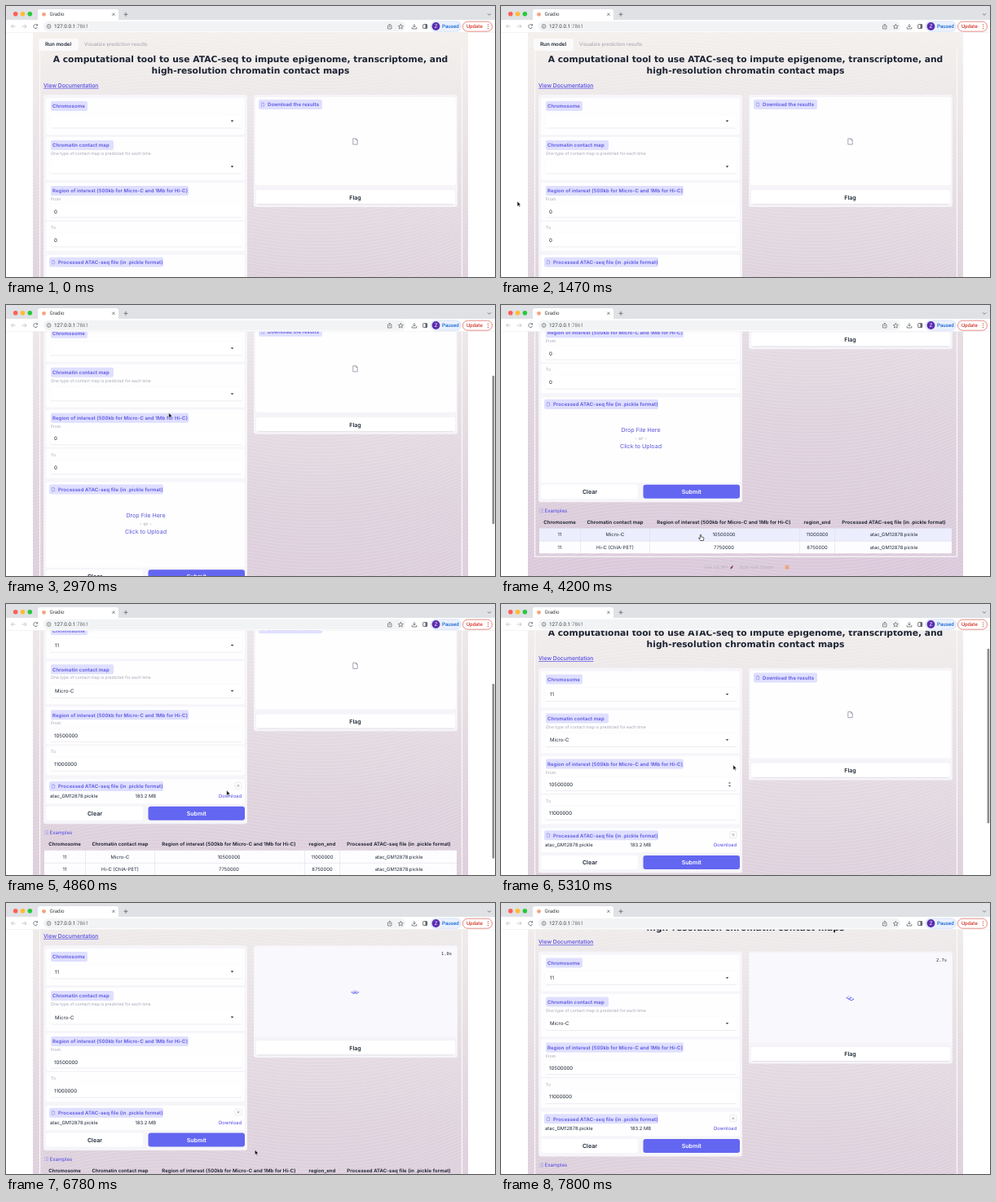
An HTML page for the animation above (7830 ms loop, 600 by 333 pixels).

```html
<!DOCTYPE html>
<html lang="en">
<head>
<meta charset="utf-8">
<title>Gradio</title>
<style>
  html, body { margin: 0; width: 100%; height: 100%; overflow: hidden; background: #fff; }
  svg { display: block; width: 600px; height: 333px; }
  text { font: 400 6.1px Inter, "Open Sans", sans-serif; fill: #1f2937; text-rendering: geometricPrecision; }
  .label { font-size: 6px; font-weight: 600; letter-spacing: .015em; fill: #5a55e0; }
  .hint { font-size: 5.1px; fill: #a3a7b3; }
  .title { font: bold 10.72px "DejaVu Sans", sans-serif; fill: #1c2333; }
  .tab { font-size: 6.3px; font-weight: 600; }
  .muted { fill: #a0a1a9; }
  .link { fill: #4f46e5; }
  .doc { font-size: 6.8px; font-weight: 500; text-decoration: underline; }
  .drop { font-size: 7.1px; fill: #5a55d6; }
  .button { font-size: 7.1px; font-weight: 600; }
  .head { font-size: 6px; font-weight: 600; fill: #111827; letter-spacing: .01em; }
  .cell { font-size: 5.9px; }
  .foot { font-size: 5.4px; fill: #bbb0bb; }
  .mid { text-anchor: middle; }
  .end { text-anchor: end; }
  .mono { font: 5.4px "DejaVu Sans Mono", monospace; }
  .chrome { font: 6.2px Roboto, sans-serif; fill: #3c4043; }
  .icon { fill: none; stroke: #5f6368; stroke-width: .8; }
  .faint { stroke: #b9bbc0; }
</style>
</head>
<body>
<svg id="stage" viewBox="0 0 600 333"></svg>
<script>
const LOOP = 7830, FILL_AT = 4410, SUBMIT_AT = 6110;
const VIEW_TOP = 33, VIEW_HEIGHT = 300, COLLAPSE = 74, FRAME_BOTTOM = 502;

// Builders: all page coordinates are for an unscrolled page.
const text = (x, y, s, cls = '', attrs = '') => `<text x="${x}" y="${y}" class="${cls}" ${attrs}>${s}</text>`;
const rect = (x, y, w, h, fill, r = 0, attrs = '') =>
  `<rect x="${x}" y="${y}" width="${w}" height="${h}" rx="${r}" fill="${fill}" ${attrs}/>`;
const path = (d, attrs = 'class="icon"') => `<path d="${d}" ${attrs}/>`;
const circle = (x, y, r, fill) => `<circle cx="${x}" cy="${y}" r="${r}" fill="${fill}"/>`;
const group = (id, ...parts) => `<g id="${id}">${parts.join('')}</g>`;
const block = (x, y, w, h) => rect(x, y, w, h, '#fefeff', 2.5);
const pill = (x, y, w, s, pad = 2) => rect(x, y, w, 12, '#dfdfff', 2) + text(x + pad, y + 8.3, s, 'label');
const fileIcon = (x, y, k, color) =>
  path('M-3-4H1L3-2V4H-3ZM1-4V-2H3', `transform="translate(${x} ${y}) scale(${k})" fill="none" stroke="${color}" stroke-width=".9"`);
const field = y => rect(54, y, 236, 17, '#fff', 2, 'stroke="#f9f9fb" stroke-width=".6"') +
  path(`M55 ${y + 17}H289`, 'stroke="#e9e9ee" stroke-width=".7"');
const arrow = y => path(`M275.7 ${y}h3.6l-1.8 1.9z`, 'fill="#1f2937"');

function background() {
  let waves = '';
  for (let y = 40; y < 620; y += 4) waves += `M33 ${y}q130-46 267-20t267-34`;
  return `<defs><linearGradient id="sky" x1="0" y1="0" x2="0" y2="1">
    <stop offset="0" stop-color="#f3f0ed"/><stop offset=".3" stop-color="#e8e1e5"/>
    <stop offset=".6" stop-color="#dfd3dd"/><stop offset="1" stop-color="#dac9db"/></linearGradient>
    <clipPath id="column"><rect x="33" y="32" width="534" height="494"/></clipPath></defs>` +
    rect(33, 32, 534, 494, 'url(#sky)') +
    path(waves, 'fill="none" stroke="#fff" opacity=".18" clip-path="url(#column)"');
}

function header() {
  return rect(40, 40, 49, 15, '#fbfafa', 2) +
    text(48, 48.9, 'Run model', 'tab') +
    text(96, 48.9, 'Visualize prediction results', 'muted') +
    text(300, 69.2, 'A computational tool to use ATAC-seq to impute epigenome, transcriptome, and', 'title mid') +
    text(300, 83.4, 'high-resolution chromatin contact maps', 'title mid') +
    text(46, 99.8, 'View Documentation', 'link doc');
}

function inputs() {
  return block(49, 113, 244, 45) + pill(55, 117, 45, 'Chromosome') + field(133) + arrow(140.6) +
    block(49, 161, 244, 53) + pill(55, 165, 77, 'Chromatin contact map') +
    text(55, 183.2, 'One type of contact map is predicted for each time', 'hint') + field(189) + arrow(196.6) +
    block(49, 217, 244, 46) + pill(55, 221, 169, 'Region of interest (500kb for Micro-C and 1Mb for Hi-C)') +
    text(55, 239, 'From', 'hint') + field(243) +
    block(49, 265, 244, 36) + text(55, 274.2, 'To', 'hint') + field(279);
}

function emptyForm() {
  return block(49, 306, 244, 105) + text(59, 254.5, '0') + text(59, 289.8, '0') +
    text(171.5, 349.2, 'Drop File Here', 'drop mid') +
    text(171.5, 359, '- or -', 'muted mid') +
    text(171.5, 369.2, 'Click to Upload', 'drop mid');
}

function filledForm() {
  return block(49, 306, 244, 30) + text(60, 143.6, '11') + text(60, 199.6, 'Micro-C') +
    text(59, 254.5, '10500000') + text(59, 289.8, '11000000') +
    text(54, 328.6, 'atac_GM12878.pickle', 'cell') + text(158.5, 328.6, '183.2 MB', 'cell') +
    text(289, 328.6, 'Download', 'cell link end') +
    rect(281, 310, 8, 8, '#fff', 1.5, 'stroke="#dcdce4" stroke-width=".6"') +
    path('M283.5 312.5l3 3m0-3l-3 3', 'stroke="#7c8090" stroke-width=".6"');
}

function lowerPart() {
  const centers = [72, 140, 273.5, 388, 482];
  const row = (y, cls, cells) => cells.map((s, i) => text(centers[i], y, s, cls + ' mid')).join('');
  return rect(49, 413.5, 119, 17, '#fff', 3) + text(109, 424.6, 'Clear', 'button mid') +
    rect(174.5, 413.5, 118.5, 17, '#6366f1', 3, 'id="submit"') +
    text(233.7, 424.6, 'Submit', 'button mid', 'style="fill:#fff"') +
    path('M47 443.5h1m1 0h3M47 445.5h1m1 0h3M47 447.5h1m1 0h3', 'stroke="#8a87e8" stroke-width=".6"') +
    text(53.5, 447.5, 'Examples', 'link', 'font-weight="500"') +
    rect(47, 467.5, 506, 30.5, '#fdfdff', 1) + rect(47, 467.5, 506, 15.5, '#eceefd', 0, 'id="rowHover"') +
    path('M47 467.5H553M47 483H553M97.5 467.5V498M182.5 467.5V498M366.5 467.5V498M409.5 467.5V498',
      'stroke="#dfdfe8" stroke-width=".6"') +
    row(462.2, 'head', ['Chromosome', 'Chromatin contact map', 'Region of interest (500kb for Micro-C and 1Mb for Hi-C)',
      'region_end', 'Processed ATAC-seq file (in .pickle format)']) +
    row(477.3, 'cell', ['11', 'Micro-C', '10500000', '11000000', 'atac_GM12878.pickle']) +
    row(493, 'cell', ['11', 'Hi-C (ChIA-PET)', '7750000', '8750000', 'atac_GM12878.pickle']) +
    text(249, 517, 'Use via API', 'foot') + path('M281 517.5l1-3 3-2-1 3.5z', 'fill="#8c4a5e"') +
    text(290, 517, '· Built with Gradio', 'foot') + rect(348.5, 512.5, 5, 5, '#eda883', 1);
}

function output() {
  const upper = 'M256 0L510 140V221L256 82L0 221V140Z';
  const lower = 'M0 140L255 280L510 140V221L255 361L0 221Z';
  const ring = id => group(id, path(upper, 'fill="#6366f1" opacity=".4"'), path(lower, 'fill="#6366f1"'));
  return rect(304, 109, 250, 138, '#f6f4f8', 3) + block(306, 112, 246, 108) +
    group('ready', pill(310, 115, 78, 'Download the results', 11), fileIcon(315, 121, .55, '#7c78e6'),
      fileIcon(428.5, 166.5, .9, '#8f93a0')) +
    group('loading', rect(305, 111, 248, 110, '#f9f9fd', 2),
      text(547, 121.3, '', 'mono end', 'id="timer"'),
      `<g transform="translate(428.3 166.5) scale(.0125)">${ring('ringA')}${ring('ringB')}</g>`) +
    rect(307, 226.3, 244, 17, '#fff', 2.5) + path('M309 243.8H549', 'stroke="#dddbe2" stroke-width=".8"') +
    text(428.5, 237.8, 'Flag', 'button mid');
}

function browser() {
  const lights = ['#ff5f57', '#febc2e', '#28c840'].map((c, i) => circle(11.7 + i * 8.8, 9.8, 2.8, c)).join('');
  const thin = 'class="icon" style="stroke-width:.7"';
  return rect(0, 0, 600, 18, '#dfe1e5') + lights + rect(39, 4, 99, 16, '#fff', 3) + rect(0, 17, 600, 15.6, '#fff') +
    circle(46.5, 10.3, 2.4, '#f3a27c') + text(53.5, 12.4, 'Gradio', 'chrome') +
    path('M130.3 8.7l3.2 3.2m0-3.2l-3.2 3.2M147 7.8v5m-2.5-2.5h5M591 9.3l2 2 2-2') +
    path('M11.5 25H6.5m2.3-2.3L6.5 25l2.3 2.3M19.5 25H25m-2.3-2.3L25 25l-2.3 2.3', 'class="icon faint"') +
    path('M38.4 23.7a2.5 2.5 0 1 0 .2 2.2M38.6 22.1v1.9h-1.9') +
    rect(46, 18.8, 444, 12.5, '#f1f3f4', 6.2) +
    path('M55 25a2.4 2.4 0 1 1-4.8 0a2.4 2.4 0 1 1 4.8 0M52.6 24.6v1.7M52.6 23.2v.6', thin) +
    text(59, 27.2, '127.0.0.1<tspan fill="#777b80">:7861</tspan>', 'chrome', 'style="font-size:6.35px"') +
    path('M469.5 24h-1v4h4.5v-4h-1M470.8 26.3V22m-1.3 1.3l1.3-1.3 1.3 1.3', thin) +
    path('M484.3 22.3l.9 2 2.1.2-1.6 1.4.5 2.1-1.9-1.1-1.9 1.1.5-2.1-1.6-1.4 2.1-.2z', thin) +
    path('M501 22v4m-1.8-1.7l1.8 1.8 1.8-1.8M498.2 26v2h5.6v-2') +
    rect(511.7, 22.6, 5, 5, 'none', .6, 'stroke="#5f6368" stroke-width=".9"') + rect(514.5, 22.6, 2.2, 5, '#5f6368') +
    rect(521, 18.9, 37.5, 12.4, '#eaf1fd', 6.2, 'stroke="#c5d6f5" stroke-width=".6"') +
    circle(527.5, 25, 4.9, '#5b2db0') + text(527.5, 27, 'Z', 'chrome mid', 'style="fill:#fff"') +
    text(535, 27.3, 'Paused', 'chrome', 'style="fill:#1a67d2;font-weight:500"') +
    rect(560.5, 19.2, 36, 12, '#fff', 6, 'stroke="#dd7068" stroke-width=".8"') +
    text(565, 27.3, 'Update', 'chrome', 'style="fill:#d33a2f;font-weight:500"') +
    path('M591.5 22.2v1m0 1.4v1m0 1.4v1', 'stroke="#d33a2f" stroke-width="1.1"') +
    path('M0 32.6H600', 'stroke="#e6e7ea" stroke-width=".5"');
}

const stage = document.getElementById('stage');
stage.innerHTML = group('page', background(),
    path('', 'fill="none" stroke="#fbf8f5" stroke-width="1.3" id="frame"'), header(),
    rect(46, 109, 250, 326, '#f6f5f9', 3, 'id="card"'), inputs(), group('empty', emptyForm()), group('filled', filledForm()),
    pill(53, 308.7, 140, 'Processed ATAC-seq file (in .pickle format)', 11), fileIcon(58, 314.7, .55, '#7c78e6'),
    path('M278.8 251l1.7-1.9 1.7 1.9zM278.8 253.2h3.4l-1.7 1.9z', 'id="spinner" fill="#60636b"'),
    group('lower', lowerPart()), output()) +
  rect(596.6, 33, 2.6, 180, '#8b8b8e', 1.3, 'id="thumb"') + browser() +
  group('cursor',
    path('M0 0V6.3L1.5 4.9 2.5 7.1 3.5 6.7 2.5 4.5H4.5Z', 'id="arrow" fill="#111" stroke="#fff" stroke-width=".5"'),
    path('M-1.2 1.5V-3q.7-1 1.4 0V-.6L2.8 0q.7.3.6 1.1L2.9 4H-.8L-3 1q0-1 1.2-.1z',
      'id="hand" fill="#fff" stroke="#222" stroke-width=".7"'));

const el = id => document.getElementById(id);
const show = (id, on) => el(id).setAttribute('display', on ? 'inline' : 'none');
const move = (id, x, y) => el(id).setAttribute('transform', `translate(${x} ${y})`);
const within = (t, from, to) => t >= from && t < to;
const linear = u => u;
const smooth = u => u * u * (3 - 2 * u);

// Each key is [time, ...values].
function track(keys, t, ease) {
  const i = keys.findIndex(k => k[0] > t);
  if (i < 0) return keys.at(-1).slice(1);
  if (i === 0) return keys[0].slice(1);
  const [a, b] = [keys[i - 1], keys[i]];
  const u = ease((t - a[0]) / (b[0] - a[0]));
  return a.slice(1).map((v, n) => v + (b[n + 1] - v) * u);
}

const scrollKeys = [[2370, 0], [2490, 16], [2700, 16], [2970, 88], [3180, 121], [3480, 121], [3900, 192.8], [4409, 192.8],
  [4410, 119], [4650, 119], [5310, 30.5], [5430, 27], [5580, 27], [5820, 53], [5910, 57], [6810, 57], [7200, 49.4]];
const cursorKeys = [[480, -12, 300], [690, 6, 260], [870, 6, 260], [990, 20, 240], [1620, 20, 240], [2250, 199.7, 132.5],
  [3480, 199.7, 132.5], [4080, 245.5, 285.5], [4420, 245.5, 285.5], [5160, 284.8, 197.7], [5400, 284.8, 197.7],
  [5880, 260, 288], [6500, 260, 288], [7300, 420, 342]];
const RING_PERIOD = 1440;
const ringKeys = [[0, 125, 140], [360, -125, 140], [720, -125, 0], [1080, 125, 0], [RING_PERIOD, 125, 140]];

function draw(t) {
  const filled = t >= FILL_AT, loading = t >= SUBMIT_AT;
  const [scroll] = track(scrollKeys, t, linear);
  const shift = filled ? COLLAPSE : 0;
  move('page', 0, -scroll);
  move('lower', 0, -shift);
  el('card').setAttribute('height', 326 - shift);
  el('frame').setAttribute('d', `M41.5 53V${FRAME_BOTTOM - shift}H559.5V53`);
  show('empty', !filled);
  show('filled', filled);
  show('ready', !loading);
  show('loading', loading);
  show('spinner', within(t, 5100, 5600));

  const ratio = VIEW_HEIGHT / (493 - shift);
  show('thumb', within(t, 2370, 4150) || within(t, 4600, 6250) || within(t, 6810, 7500));
  el('thumb').setAttribute('y', VIEW_TOP + scroll * ratio);
  el('thumb').setAttribute('height', VIEW_HEIGHT * ratio);

  const overRow = within(t, 4020, FILL_AT), overSubmit = within(t, 5800, 6650);
  show('rowHover', overRow);
  el('submit').setAttribute('fill', overSubmit ? '#8285f0' : '#6366f1');
  move('cursor', ...track(cursorKeys, t, smooth));
  show('hand', overRow || overSubmit);
  show('arrow', !(overRow || overSubmit));

  if (loading) {
    const elapsed = (t - SUBMIT_AT) * 1.6;
    el('timer').textContent = (Math.floor(elapsed / 100) / 10).toFixed(1) + 's';
    const [x, y] = track(ringKeys, elapsed % RING_PERIOD, smooth);
    move('ringA', x - 255, y - 180);
    move('ringB', -x - 255, -y - 180);
  }
}

function tick() {
  draw(performance.now() % LOOP);
  requestAnimationFrame(tick);
}
tick();
</script>
</body>
</html>
```
